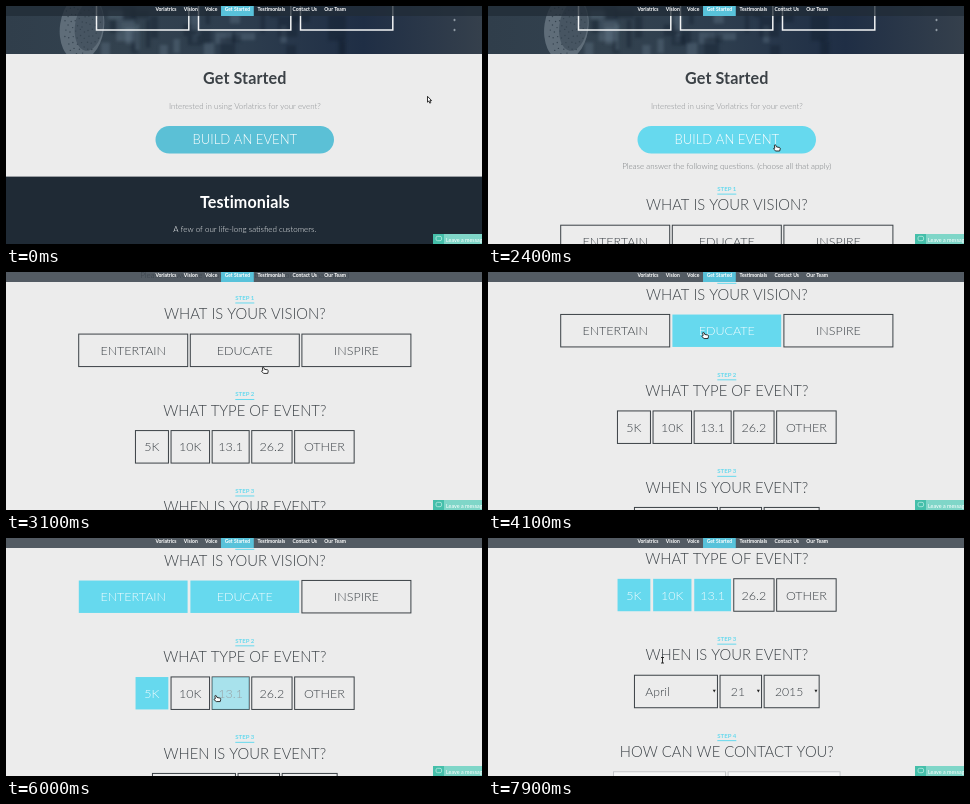
An HTML page with a canvas for the animation above (8 s loop, 476 px wide and 238 px high).

```html
<!DOCTYPE html>
<html lang="en">
<head>
<meta charset="utf-8">
<title>Event builder</title>
<style>
html, body { margin: 0; width: 100%; height: 100%; overflow: hidden; background: #ececec; }
canvas { display: block; width: 476px; height: 238px; }
</style>
</head>
<body>
<canvas id="stage"></canvas>
<script>
const W = 476, H = 238, MID = 238.8, LOOP = 8000, TICK = 100;
const NOTCH = 19.64, STEP_GAP = 96.5, BOX_H = 33, BOX_GAP = 1.6;
const CYAN = '#66d9ee', INK = '#3b4146', PAPER = '#ececec', NAVY = '#1f2a35';
const NAV = ['Vorlatrics', 'Vision', 'Voice', 'Get Started', 'Testimonials', 'Contact Us', 'Our Team'];

const canvas = document.getElementById('stage');
const ctx = canvas.getContext('2d');
const ratio = window.devicePixelRatio || 1;
canvas.width = W * ratio;
canvas.height = H * ratio;

const ramp = (t, from, to) => Math.max(0, Math.min(1, (t - from) / (to - from)));
const swing = k => 0.5 - Math.cos(k * Math.PI) / 2;
const lerp = (a, b, k) => a + (b - a) * k;
const mix = (a, b, k) => `rgb(${a.map((v, i) => Math.round(lerp(v, b[i], k))).join()})`;

// Wheel notches, in bursts
const scrollTop = t => NOTCH * (8 * ramp(t, 2400, 3100) + ramp(t, 3200, 3300)
  + 3 * ramp(t, 6700, 6850) + 2 * ramp(t, 7800, 7900));

// Pointer moves: leave, arrive, x, y
const MOVES = [
  [300, 1200, 298, 139], [1300, 1800, 287, 138.6], [2400, 3100, 257, 95],
  [3500, 3900, 232, 60], [4000, 4400, 118, 61], [4500, 4800, 161, 148.5],
  [4900, 5100, 147, 158], [5500, 6200, 224, 157], [6200, 6600, 173, 102],
  [7300, 7700, 173.5, 120]
];

// Options: label, width, time chosen
const VISIONS = [['ENTERTAIN', 110, 4300], ['EDUCATE', 110, 3800], ['INSPIRE', 110]];
const TYPES = [['5K', 34, 5400], ['10K', 39.5, 7300], ['13.1', 38, 6000], ['26.2', 41.3], ['OTHER', 60.5]];
const DATES = [['April', 84], ['21', 42.5], ['2015', 56]];

function random(seed) {
  return () => (seed = seed * 16807 % 2147483647) / 2147483647;
}

function setFont(size, weight) {
  ctx.font = `${weight} ${size}px Lato, "Open Sans", sans-serif`;
  ctx.letterSpacing = weight === 700 && size > 10 ? '0.1px' : '0px';
}

function text(s, x, y, size, weight, color, align = 'center') {
  setFont(size, weight);
  ctx.textAlign = align;
  ctx.fillStyle = color;
  ctx.fillText(s, x, y + size * 0.36);
}

const title = (s, y, color) => text(s, MID, y, 16.1, 700, color);
const caption = (s, y, color) => text(s, MID, y, 7.97, 300, color);

function rect(x, y, w, h, color) {
  ctx.fillStyle = color;
  ctx.fillRect(x, y, w, h);
}

function frame(x, y, w, h, color, width) {
  ctx.strokeStyle = color;
  ctx.lineWidth = width;
  ctx.strokeRect(x + 0.5, y + 0.5, w - 1, h - 0.5);
}

function disc(x, y, rx, ry, tilt, color) {
  ctx.beginPath();
  ctx.ellipse(x, y, rx, ry, tilt, 0, 7);
  ctx.fillStyle = color;
  ctx.fill();
}

function speaker(x, y) {
  disc(x, y, 22, 34, 0.15, '#5f6d79');
  disc(x + 7, y - 1, 14, 25, 0.15, '#475562');
  for (let i = 0; i < 70; i++) {
    const a = i * 2.4, r = Math.sqrt(i / 70);
    disc(x + Math.cos(a) * 19 * r, y + Math.sin(a) * 30 * r, 0.7, 0.7, 0, '#364450');
  }
}

function video(t) {
  ctx.save();
  ctx.beginPath();
  ctx.rect(0, 0, W, 48);
  ctx.clip();
  const g = ctx.createLinearGradient(0, 0, W, 0);
  ['#303e4b', '#33424f', '#2d3d4e', '#1f2e45', '#35404c'].forEach((c, i) => g.addColorStop(i / 4, c));
  rect(0, 0, W, 48, g);
  const rnd = random(29), drift = t / 1000;
  ctx.filter = 'blur(1.5px)';
  for (let i = 0; i < 34; i++) {
    const x = 95 + rnd() * 250 + drift * (rnd() - 0.5) * 2;
    rect(x, rnd() * 40, 4 + rnd() * 16, 6 + rnd() * 22,
      rnd() < 0.4 ? 'rgba(120,140,158,0.28)' : 'rgba(18,30,46,0.4)');
  }
  ctx.filter = 'none';
  speaker(76 + drift, 21);
  for (const y of [14, 24]) disc(448.5, y, 1, 1.3, 0, '#8f9aa4');
  for (let i = 0; i < 3; i++) frame(90 + i * 102, -20, 93.3, 44, '#f2f4f5', 1.5);
  ctx.restore();
}

function row(items, y, paint) {
  let x = MID - items.reduce((sum, [, w]) => sum + w + BOX_GAP, -BOX_GAP) / 2;
  for (const item of items) {
    paint(item, x, y);
    x += item[1] + BOX_GAP;
  }
}

function option([label, w, chosen], x, y, t) {
  const on = chosen ? ramp(t, chosen - 100, chosen + 100) : 0;
  if (on < 1) frame(x, y, w, BOX_H, INK, 1);
  ctx.globalAlpha = on;
  rect(x + 0.6, y + 0.6, w - 1.2, BOX_H - 0.6, CYAN);
  ctx.globalAlpha = 1;
  text(label, x + w / 2, y + 16.8, 12.5, 300, mix([59, 65, 70], [242, 252, 254], on));
}

function select([label, w], x, y) {
  frame(x, y, w, BOX_H, INK, 1);
  text(label, x + 11.3, y + 16.8, 12.2, 300, INK, 'left');
  ctx.fillStyle = '#222';
  ctx.fill(new Path2D(`M${x + w - 5.2} ${y + 15}h3l-1.5 2.8Z`));
}

function input([, w], x, y) {
  rect(x, y, w, BOX_H, '#f6f6f6');
  frame(x, y, w, BOX_H, '#c4c6c8', 1);
}

function form(t, open) {
  const choose = (item, x, y) => option(item, x, y, t);
  const steps = [
    ['WHAT IS YOUR VISION?', VISIONS, choose],
    ['WHAT TYPE OF EVENT?', TYPES, choose],
    ['WHEN IS YOUR EVENT?', DATES, select],
    ['HOW CAN WE CONTACT YOU?', [['', 113], ['', 113]], input]
  ];
  ctx.save();
  ctx.beginPath();
  ctx.rect(0, 150, W, open);
  ctx.clip();
  caption('Please answer the following questions. (choose all that apply)', 159.9, '#777b7e');
  steps.forEach(([heading, items, paint], i) => {
    const y = 182.8 + i * STEP_GAP;
    text('STEP ' + (i + 1), MID, y, 6, 700, CYAN);
    rect(MID - 9.5, y + 4.8, 19, 1, CYAN);
    text(heading, MID, y + 16.3, 14.8, 300, INK);
    row(items, y + 35.9, paint);
  });
  ctx.restore();
}

function page(t) {
  const open = 430 * swing(ramp(t, 1900, 2300));
  rect(0, 0, W, 700, PAPER);
  video(t);
  title('Get Started', 72.7, INK);
  caption('Interested in using Vorlatrics for your event?', 99.8, '#8a8d90');
  ctx.beginPath();
  ctx.roundRect(149.5, 120, 178.5, 27.5, 13.75);
  ctx.fillStyle = mix([91, 192, 214], [102, 217, 238], ramp(t, 1200, 1700));
  ctx.fill();
  text('BUILD AN EVENT', MID, 133.5, 13.1, 300, '#fff');
  if (open > 0) form(t, open);
  const y = 170.6 + open;
  rect(0, y, W, 600, NAVY);
  title('Testimonials', y + 25.2, '#fff');
  caption('A few of our life-long satisfied customers.', y + 52.3, '#f4f6f7');
}

function navBar() {
  rect(0, 0, W, 10, 'rgba(32,43,54,0.75)');
  let x = 340;
  for (const label of [...NAV].reverse()) {
    setFont(5, 700);
    const w = ctx.measureText(label).width;
    if (label === 'Get Started') rect(x - w - 3.6, 0, w + 7.2, 10, '#58c2da');
    text(label, x, 3, 5, 700, '#fff', 'right');
    x -= w + 7.3;
  }
}

function chat() {
  rect(427, 228, 49, 10, '#7fd6c8');
  rect(427, 228, 11, 10, '#45bfaa');
  ctx.strokeStyle = '#b9ece3';
  ctx.lineWidth = 0.8;
  ctx.beginPath();
  ctx.roundRect(430, 230.3, 5.6, 4.4, 1.6);
  ctx.stroke();
  text('Leave a message', 440, 233.7, 5.4, 400, '#fff', 'left');
}

const ARROW = new Path2D('M.5 .3V6.2L1.8 5L2.8 7.2L3.8 6.7L2.9 4.6H4.6Z');
const HAND = new Path2D('M-.6 .6Q.2 0 .9 .7L1.5 2.3L4.6 2.9Q5.4 3.2 5.2 4.2L4.7 6.4H.8L-1.5 4.4Q-1.4 3.4-.2 3.6Z');
const BEAM = new Path2D('M-.5-.5h3M1-.5v5.5M-.5 5h3');

function pointer(t) {
  let x = 421, y = 90;
  for (const [leave, arrive, toX, toY] of MOVES) {
    const k = swing(ramp(t, leave, arrive));
    x = lerp(x, toX, k);
    y = lerp(y, toY, k);
  }
  const path = t < 1200 ? ARROW : t < 7900 ? HAND : BEAM;
  ctx.save();
  ctx.translate(x, y);
  ctx.lineJoin = 'round';
  ctx.lineWidth = 0.9;
  ctx.fillStyle = '#fff';
  ctx.strokeStyle = '#1c1c1c';
  if (path !== BEAM) ctx.fill(path);
  ctx.stroke(path);
  ctx.restore();
}

function draw(now) {
  const t = Math.floor((now % LOOP) / TICK) * TICK;
  ctx.setTransform(ratio, 0, 0, ratio, 0, 0);
  ctx.save();
  ctx.translate(0, -scrollTop(t));
  page(t);
  ctx.restore();
  navBar();
  chat();
  pointer(t);
}

let start;
function loop(now) {
  start ??= now;
  draw(Math.max(0, now - start));
  requestAnimationFrame(loop);
}
draw(0);
requestAnimationFrame(loop);
</script>
</body>
</html>
```
